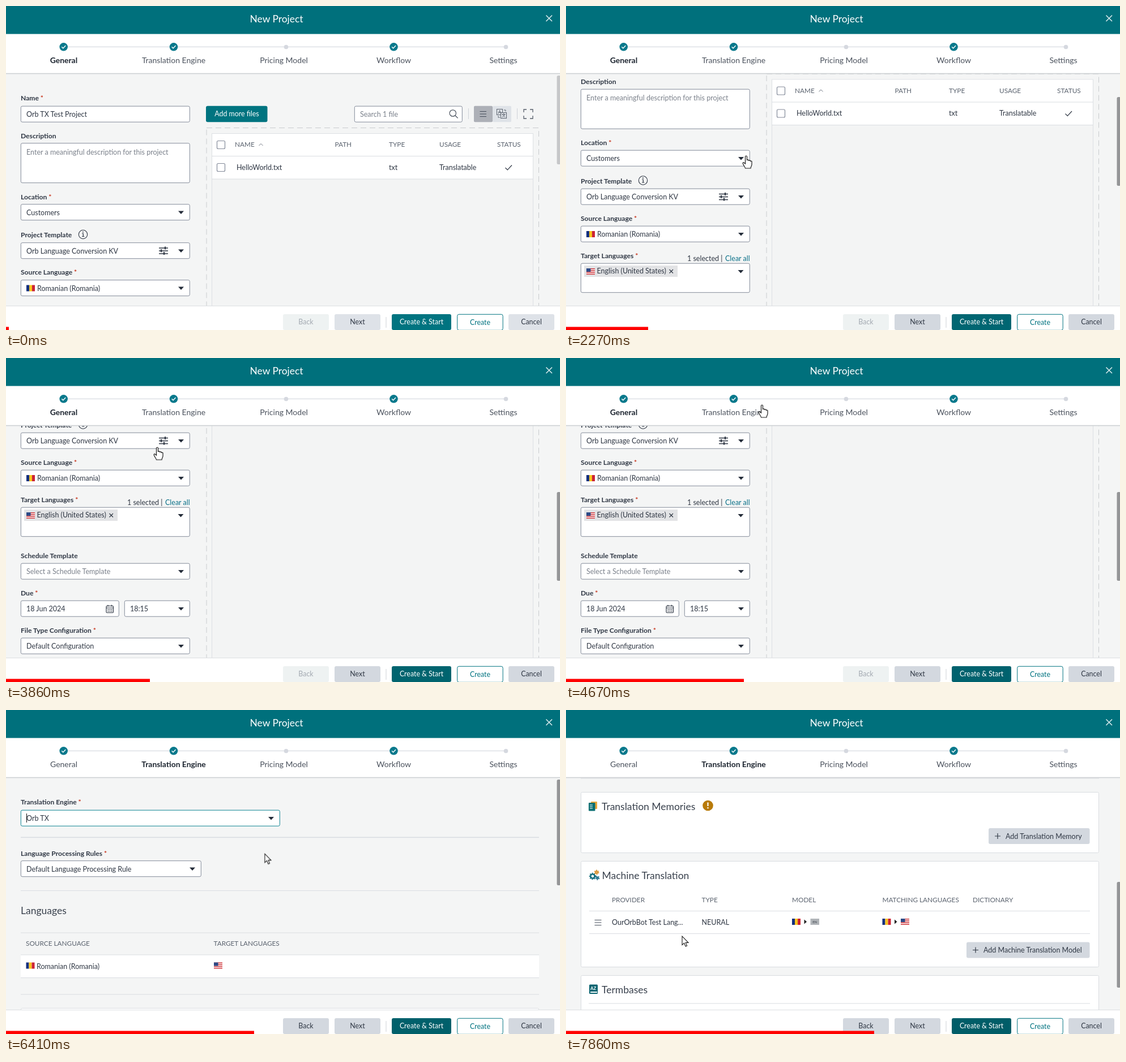
An HTML page for the animation above (8000 ms loop, 978x573 px).

```html
<!DOCTYPE html>
<html lang="en">
<head>
<meta charset="utf-8">
<title>New Project</title>
<style>
html, body { margin: 0; width: 100%; height: 100%; overflow: hidden; background: #f4f5f5; }
svg { display: block; }
text { font-family: Lato, "Open Sans", sans-serif; white-space: pre; }
.form, .formBar, .engine, .engineBar, .tabA, .tabB, .bar, .cursor, .arrow, .hand, .teal, .grey {
  animation: 8s linear infinite;
}
.tabA { animation-name: tabA; animation-timing-function: step-end; }
.tabB { animation-name: tabB; animation-timing-function: step-end; }
.form { animation-name: form; }
.formBar { animation-name: formBar; }
.engine { animation-name: engine; }
.engineBar { animation-name: engineBar; }
.bar { animation-name: bar; }
.cursor { animation-name: cursor; animation-timing-function: ease-in-out; }
.arrow { animation-name: arrow; animation-timing-function: step-end; }
.hand { animation-name: hand; animation-timing-function: step-end; }
.teal { animation-name: teal; }
.grey { animation-name: grey; }

@keyframes tabA { 0% { visibility: visible } 60%, 100% { visibility: hidden } }
@keyframes tabB { 0% { visibility: hidden } 60%, 100% { visibility: visible } }
@keyframes form {
  0%, 25% { transform: translateY(0) }
  27%, 33.1% { transform: translateY(-95.5px) }
  35.1%, 36.6% { transform: translateY(-191px) }
  38.6%, 100% { transform: translateY(-286.5px) }
}
@keyframes formBar {
  0% { fill: #c6c7c9 }
  14% { fill: #abacae }
  0%, 25% { transform: translateY(0) }
  27%, 33.1% { transform: translateY(38px); fill: #949597 }
  35.1%, 36.6% { transform: translateY(76px) }
  38.6%, 100% { transform: translateY(114px); fill: #949597 }
}
@keyframes engine {
  0%, 82% { transform: translateY(0) }
  83.75% { transform: translateY(-95.5px) }
  85.4% { transform: translateY(-191px) }
  87%, 87.5% { transform: translateY(-286.5px) }
  88.375% { transform: translateY(-321.5px) }
  90%, 100% { transform: translateY(-382px) }
}
@keyframes engineBar {
  0%, 82% { transform: translateY(0) }
  83.75% { transform: translateY(45px) }
  85.4% { transform: translateY(90px) }
  87%, 87.5% { transform: translateY(135px) }
  88.375% { transform: translateY(152px) }
  90%, 100% { transform: translateY(181px) }
}
@keyframes bar {
  0% { transform: translateX(5px) }
  14.375% { transform: translateX(65px) }
  28.375% { transform: translateX(145px) }
  48.25% { transform: translateX(254px) }
  67.625% { transform: translateX(369px) }
  88.375% { transform: translateX(484px) }
  98.25% { transform: translateX(544px) }
  100% { transform: translateX(552px) }
}
@keyframes cursor {
  0%, 5% { transform: translate(480px, -25px) }
  12%, 15.5% { transform: translate(354px, 132px) }
  22.5%, 39.5% { transform: translate(318px, 265px) }
  45%, 52.5% { transform: translate(267px, 158px) }
  58.5%, 69% { transform: translate(346px, 83px) }
  81%, 89% { transform: translate(458px, 256px) }
  96.5%, 100% { transform: translate(205px, 400px) }
}
@keyframes arrow {
  0% { visibility: visible }
  21.5% { visibility: hidden }
  53.5% { visibility: visible }
  57% { visibility: hidden }
  71%, 100% { visibility: visible }
}
@keyframes hand {
  0% { visibility: hidden }
  21.5% { visibility: visible }
  53.5% { visibility: hidden }
  57% { visibility: visible }
  71%, 100% { visibility: hidden }
}
@keyframes teal { 0% { fill: #007480 } 13% { fill: #006874 } 100% { fill: #005d68 } }
@keyframes grey { 0% { fill: #dee2e8 } 13%, 100% { fill: #d3d8df } }
</style>
</head>
<body>
<script>
const INK = '#2f3744', TEAL = '#007380', EDGE = '#838a99', RULE = '#dadde2', GREY = '#d3d8df';

// Text kinds: size, weight, colour, anchor
const KINDS = {
  body: [12.5, 400, INK],
  hint: [12.5, 400, '#7b818b'],
  link: [12.5, 400, '#0b7189'],
  label: [12.1, 700, INK],
  head: [11.8, 400, '#5b636f'],
  h2: [17.5, 400, '#39414d'],
  title: [17.4, 400, '#fff', 'middle'],
  step: [14, 400, '#4b525d', 'middle'],
  stepOn: [13.9, 700, '#1d2530', 'middle'],
  button: [12.4, 400, INK, 'middle'],
  buttonOn: [12.4, 400, '#fff', 'middle'],
  buttonOff: [12.4, 400, '#a3a9b1', 'middle'],
  buttonLine: [12.4, 400, TEAL, 'middle']
};

// Text placed by the vertical centre of its capitals
function text(x, cy, str, kind = 'body') {
  const [size, weight, fill, anchor = 'start'] = KINDS[kind];
  return `<text x="${x}" y="${cy + size * 0.36}" font-size="${size}" font-weight="${weight}" fill="${fill}" text-anchor="${anchor}">${str}</text>`;
}
const rect = (x, y, w, h, fill, more = '') =>
  `<rect x="${x}" y="${y}" width="${w}" height="${h}" fill="${fill}" ${more}/>`;
const path = (d, stroke = INK, width = 1.2, fill = 'none', more = '') =>
  `<path d="${d}" stroke="${stroke}" stroke-width="${width}" fill="${fill}" ${more}/>`;
const circle = (x, y, r, fill, more = '') => `<circle cx="${x}" cy="${y}" r="${r}" fill="${fill}" ${more}/>`;
const hline = (y, x1 = 26, x2 = 941, w = 1) => rect(x1, y, x2 - x1, w, RULE);
const label = (cy, str, must = true) =>
  text(26, cy, str + (must ? ' <tspan fill="#c8371f">*</tspan>' : ''), 'label');
const box = (x, y, w, h, stroke = EDGE) =>
  rect(x + .3, y + .2, w - 1, h - 1, '#fff', `rx="2.5" stroke="${stroke}"`);
const drop = (x, y) => path(`M${x - 5} ${y - 2.5}h10l-5 5.5z`, 'none', 0, '#242c39');
const select = (x, y, w, str, kind, tx = x + 10, stroke) =>
  box(x, y, w, 29, stroke) + text(tx, y + 14.5, str, kind) + drop(x + w - 16, y + 14.5);
const button = (x, y, w, str, kind = 'button', fill = GREY, more = 'class="grey"') =>
  rect(x, y, w, 28, fill, `rx="3" ${more}`) + text(x + w / 2, y + 14, str, kind);
const plusButton = (x, y, w, str) =>
  rect(x, y, w, 28, GREY, 'rx="3"') + path(`M${x + 11} ${y + 14}h10m-5-5v10`) + text(x + 30, y + 14, str);
const card = (y, h) => rect(26.5, y + .5, 914, h, '#fff', 'rx="2" stroke="#d9dce0"');
const menu = (x, y, w) => path(`M${x} ${y - 4.5}h${w}m${-w} 4.5h${w}m${-w} 4.5h${w}`, '#454d5a', 1.1);
const romania = (x, y) => ['#14307f', '#f7c320', '#cc2436'].map((c, i) => rect(x + i * 5, y, 5, 11, c)).join('');
const usa = (x, y) => rect(x, y, 15, 11, '#fff') +
  [0, 1, 2, 3].map(i => rect(x, y + i * 3.1, 15, 1.6, '#d03a3f')).join('') + rect(x, y, 7.5, 6, '#2c4a86');
const tick = (x, y) => circle(x, y, 7.3, '#08798c') + path(`M${x - 3.3} ${y}l2.4 2.4 4.4-4.7`, '#fff', 1.4);
const heads = (cy, list) => list.map(([x, s]) => text(x, cy, s, 'head')).join('');
const check = (y) => rect(372.5, y - 7.5, 14, 14, '#fff', `rx="2" stroke="${EDGE}" stroke-width="1.2"`);

function formPage() {
  const calendar = rect(177, 725, 12.5, 12, '#fff', `rx="1.5" stroke="${INK}" stroke-width="1.2"`) +
    path('M177 728.5h12.5M180 723v3m6.5-3v3') +
    path('M179.5 731.5h8m-8 3h8', INK, 1.6, 'none', 'stroke-dasharray="1.8 1.3"');
  const info = circle(136, 404, 7.7, 'none', `stroke="${INK}" stroke-width="1.1"`) +
    path('M134.3 402.5h2v5m-2.2 0h4.2') + circle(135.9, 399.7, 1, INK);
  const sliders = path('M270 428h16m-16 5h16m-16 5h16', INK, 1.4) +
    path('M281 425.5v5m-7-.2v5m5-.2v5', INK, 2.2);
  const translate = rect(866.5, 182.5, 10, 10, 'none', 'stroke="#5a626e"') +
    rect(873.5, 188.5, 10, 10, '#dde1e7', 'stroke="#5a626e"') +
    path('M869 190.5l2.5-6 2.5 6m-4-2h3M875.5 191.5h6m-3-1.5v1.5m-2.5 5l5-4.5m-4.5 0l4.5 4.5', '#5a626e', 1) +
    path('M879 184h3v2.5m-13 8v2.5h3', '#5a626e', 1);
  const full = path('M914 188v-5h5m6 0h5v5m0 6v5h-5m-6 0h-5v-5', '#565e6a', 1.3);

  const fields = label(163, 'Name') + box(26, 177, 299, 29) + text(36, 191, 'Orb TX Test Project') +
    label(229.5, 'Description', false) + box(26, 242.5, 299, 71) +
    text(36, 258, 'Enter a meaningful description for this project', 'hint') +
    label(337.5, 'Location') + select(26, 350.5, 299, 'Customers') +
    label(405, 'Project Template', false) + info +
    select(26, 418.5, 299, 'Orb Language Conversion KV') + sliders +
    label(471, 'Source Language') + select(26, 484.5, 299, 'Romanian (Romania)', 'body', 55) + romania(36, 493.5) +
    label(537, 'Target Languages') + text(214, 542, '1 selected |') + text(281, 542, 'Clear all', 'link') +
    box(26, 550.5, 299, 52.5) + rect(32, 554.5, 165, 20, '#e2e3e5') + usa(36, 559.5) +
    text(54.5, 564, 'English (United States)') + path('M182.5 561.5l6.5 6.5m0-6.5l-6.5 6.5') + drop(308.5, 565) +
    label(636.5, 'Schedule Template', false) + select(26, 649.5, 299, 'Select a Schedule Template', 'hint') +
    label(702.5, 'Due') + box(26, 715.5, 174, 29) + text(36, 730, '18 Jun 2024') + calendar +
    select(209, 715.5, 116, '18:15') +
    label(768, 'File Type Configuration') + select(26, 781.5, 299, 'Default Configuration');

  const files = rect(353, 176.7, 108.5, 28.5, TEAL, 'rx="3" class="teal"') + text(407.5, 190.5, 'Add more files', 'buttonOn') +
    box(615, 177, 191, 29) + text(625, 191, 'Search 1 file', 'hint') +
    circle(788.8, 189.5, 5.7, 'none', 'stroke="#4a525e" stroke-width="1.2"') + path('M793 193.7l4.7 4.7', '#4a525e', 1.3) +
    rect(816, 181, 1, 19, '#cfd3d8') + rect(902, 181, 1, 19, '#cfd3d8') +
    rect(826, 176.7, 33, 28.5, '#adb0b7', 'rx="2"') + rect(859, 176.7, 33, 28.5, '#dfe3e8', 'rx="2"') +
    menu(836.5, 191, 11.5) + translate + full +
    rect(354, 215.5, 586.5, 900, 'none', 'stroke="#c9cbce" stroke-dasharray="10 6"') +
    rect(363.5, 225.5, 567, 800, '#f3f4f4', 'stroke="#dcdfe3"') +
    rect(364, 226, 566, 80, '#fff') + hline(265, 364, 930) + hline(305.5, 364, 930) +
    check(246) + check(286) +
    heads(245, [[404, 'NAME'], [580.5, 'PATH'], [676, 'TYPE'], [765, 'USAGE'], [867, 'STATUS']]) +
    path('M446.500 247l3.500-3.500 3.500 3.500'.replace(/00\b/g, ''), '#737a85', 1) +
    text(407, 285, 'HelloWorld.txt') + text(676, 285, 'txt') + text(765, 285, 'Translatable') +
    path('M881.5 286l3.8 3.8 7.700-8.3', INK, 1.2);
  return fields + files;
}

function enginePage() {
  const gear = (x, y, r, c) => circle(x, y, r, 'none', `stroke="${c}" stroke-width="2.4"`) +
    circle(x, y, r + 1.8, 'none', `stroke="${c}" stroke-width="1.6" stroke-dasharray="2 1.9"`);
  const memory = rect(44, 544, 11, 13, '#e9a63a', 'rx="1"') + rect(40, 546, 11.5, 14.5, '#0a6f72', 'rx="1"') +
    path('M42 550h5m-5 3h5m-5 3h5', '#fff', 1.2);
  const badge = circle(250.5, 551, 9.3, '#b87a08') + path('M250.5 545.5v6.5m0 2v2.2', '#fff', 2.2);
  const gears = gear(47, 676, 3.6, '#0a6776') + gear(54, 669, 1.8, '#d89534') + gear(55.5, 679, 1.3, '#2a7891');
  const terms = rect(41, 867.5, 15, 16.5, '#0a6470', 'rx="1.5"') + rect(43, 880, 12, 2, '#fff') +
    `<text x="43" y="877" font-size="8" font-weight="700" fill="#fff">AZ</text>`;
  const pair = (x) => romania(x, 751) + path(`M${x + 21.5} 752.5l4.5 4-4.5 4z`, 'none', 0, '#222');

  return label(163, 'Translation Engine') + select(26, 177, 458, 'Orb TX', 'body', 36, '#0b8391') +
    rect(36, 183, 1, 16, '#111') + hline(224.5, 26, 941, 1.6) +
    label(253.5, 'Language Processing Rules') + select(26, 266.5, 319, 'Default Language Processing Rule') +
    hline(319) + text(26, 355, 'Languages', 'h2') + hline(393.5) +
    heads(413, [[35, 'SOURCE LANGUAGE'], [366.5, 'TARGET LANGUAGES']]) +
    rect(26, 433, 915, 40, '#fff') + hline(432.5) + hline(473) +
    romania(35.5, 446.5) + text(54, 453, 'Romanian (Romania)') + usa(367, 446.5) + hline(502.5) +
    card(527, 107) + memory + text(63, 552.5, 'Translation Memories', 'h2') + badge +
    plusButton(746, 591, 178.5, 'Add Translation Memory') +
    card(649, 187) + gears + text(63.5, 674.5, 'Machine Translation', 'h2') +
    heads(717.5, [[81, 'PROVIDER'], [239.5, 'TYPE'], [399, 'MODEL'], [558.5, 'MATCHING LANGUAGES'], [718, 'DICTIONARY']]) +
    hline(737, 41, 925) + hline(777, 41, 925) + menu(50.5, 758, 12) +
    text(81, 757.5, 'OurOrbBot Test Lang...') + text(239.5, 757.5, 'NEURAL') +
    pair(399) + rect(431.5, 751, 15.5, 11, '#b0b4b8') +
    `<text x="439.2" y="758.7" font-size="6" font-weight="700" fill="#545a62" text-anchor="middle">EN</text>` +
    pair(558.5) + usa(591, 751) +
    plusButton(707, 792.5, 217.5, 'Add Machine Translation Model') +
    card(851, 160) + terms + text(63, 876.5, 'Termbases', 'h2') + hline(900.5, 40, 925);
}

function chrome() {
  const steps = [[102, 'General'], [296, 'Translation Engine'], [490.5, 'Pricing Model'], [684.5, 'Workflow'], [878, 'Settings']];
  const names = (on) => steps.slice(0, 2).map(([x, s], i) => text(x, 95.5, s, i === on ? 'stepOn' : 'step')).join('');
  return rect(0, 49, 978, 70, '#fff') + rect(0, 118.7, 978, 1.6, '#cdd0d3') +
    rect(0, 0, 978, 49.5, '#00707c') + text(477.5, 22.5, 'New Project', 'title') +
    path('M953.5 16.5l10.5 10.5m0-10.5l-10.5 10.5', '#d5e9eb', 1.6) +
    rect(102, 71.5, 780, 1.6, '#dfe2e8') + [101.7, 296, 684.5].map(x => tick(x, 72.3)).join('') +
    circle(494.5, 72.5, 3.8, '#d5d8df') + circle(882.5, 72.5, 3.8, '#d5d8df') +
    steps.slice(2).map(([x, s]) => text(x, 95.5, s, 'step')).join('') +
    `<g class="tabA">${names(0)}</g><g class="tabB">${names(1)}</g>` +
    rect(0, 530, 978, 43, '#fff') + rect(0, 530, 978, 1, '#dcdfe2') +
    `<g class="tabA">${button(489, 545, 81, 'Back', 'buttonOff', '#eef2f2', '')}</g>` +
    `<g class="tabB">${button(489, 545, 81, 'Back')}</g>` +
    button(580, 545, 81, 'Next') + rect(670.5, 550, 1, 19, '#cfd3d8') +
    button(681, 545, 105, 'Create &amp; Start', 'buttonOn', TEAL, 'class="teal"') +
    button(796.7, 545.3, 80.5, 'Create', 'buttonLine', '#fff', `stroke="${TEAL}"`) +
    button(887, 545, 81, 'Cancel');
}

const thumb = (name, h) => rect(972.5, 123, 7, h, '#949597', `rx="2.5" class="${name}"`);
const pointer =
  `<g class="arrow">${path('M0 0V15.5L3.6 12.2 6.1 18 8.6 17 6.2 11.4H11Z', '#1a1a1a', 1.1, '#fff')}</g>` +
  `<g class="hand">${path('M-1.5 1.5C-1.5-.5 1.5-.5 1.5 1.5V8c0-1.5 3-1.5 3 0v1c0-1.5 3-1.5 3 0v1c0-1.3 2.5-1.3 2.5 0V15c0 3-2 4-2 7H-1.5c0-2-3.2-5-4.3-8.5-.5-1.8 1.2-2.5 2.4-1L-1.5 14Z', '#1a1a1a', 1.2, '#fff')}</g>`;

document.body.innerHTML = `<svg width="978" height="573" viewBox="0 0 978 573">
  ${rect(0, 0, 978, 573, '#f4f5f5')}
  <g class="tabA"><g class="form">${formPage()}</g>${thumb('formBar', 157)}</g>
  <g class="tabB"><g class="engine">${enginePage()}</g>${thumb('engineBar', 187)}</g>
  ${chrome()}
  ${rect(-978, 567.5, 978, 5.5, '#f00', 'class="bar"')}
  <g class="cursor">${pointer}</g>
</svg>`;
</script>
</body>
</html>
```
